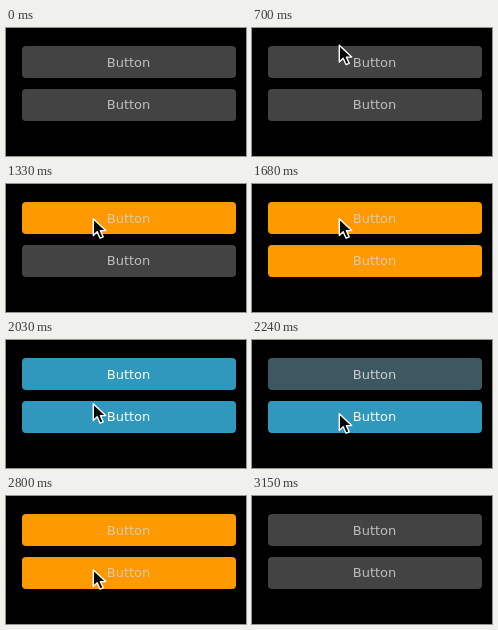
An HTML page that plays this animation: 240 by 128 pixels, repeating every 3430 ms.

```html
<!DOCTYPE html>
<html lang="en">
<head>
<meta charset="utf-8">
<title>Linked buttons</title>
<style>
  html, body { margin: 0; width: 100%; height: 100%; overflow: hidden; background: #000; }
  svg { display: block; width: 100%; height: 100%; }
  text { font: 13px "DejaVu Sans", sans-serif; text-anchor: middle; }
</style>
</head>
<body>
<svg viewBox="0 0 240 128">
  <g class="button">
    <rect x="16" y="18" width="214" height="32" rx="4"/>
    <text x="122.5" y="38.5">Button</text>
  </g>
  <g class="button">
    <rect x="16" y="61" width="214" height="32" rx="4"/>
    <text x="122.5" y="81">Button</text>
  </g>
  <path id="cursor" d="M.8 .8V17.5L4.7 13.8L7.6 20.2L10.7 18.8L7.9 12.6H13.2Z"
        fill="#080808" stroke="#fff" stroke-width="1.4" stroke-linejoin="round"/>
</svg>
<script>
const LOOP = 3430, STEP = 70;
const STYLES = {
  idle:  { fill: [67, 67, 67],   text: [190, 190, 190] },
  hover: { fill: [48, 152, 188], text: [248, 252, 253] },
  press: { fill: [255, 153, 0],  text: [218, 202, 165] }
};

// [start, state, number of fade steps]; one step is a hard change
const TOP = [
  [0, "idle", 1], [770, "hover", 4], [1330, "press", 1],
  [1750, "hover", 1], [2100, "idle", 4], [2590, "press", 4], [2940, "idle", 1]
];
const BOTTOM = [
  [0, "idle", 1], [770, "hover", 4], [1330, "idle", 1], [1470, "press", 4],
  [1750, "hover", 1], [2450, "press", 1], [2940, "hover", 1], [3080, "idle", 1]
];

// [time, y of the pointer tip]
const POINTER = [
  [560, 4], [840, 29], [980, 34], [1820, 34], [2030, 63],
  [2170, 73], [3010, 73], [3080, 102]
];
const POINTER_GONE = 3150;

const buttons = [...document.querySelectorAll(".button")];
const cursor = document.getElementById("cursor");
const mix = (a, b, k) => a + (b - a) * k;
const mixColor = (a, b, k) => `rgb(${a.map((v, i) => Math.round(mix(v, b[i], k)))})`;

function paintButton(button, track, time) {
  const i = track.findLastIndex(([start]) => start <= time);
  const [start, state, steps] = track[i];
  const from = STYLES[track[Math.max(i - 1, 0)][1]], to = STYLES[state];
  const k = Math.min(1, ((time - start) / STEP + 1) / steps);
  button.children[0].setAttribute("fill", mixColor(from.fill, to.fill, k));
  button.children[1].setAttribute("fill", mixColor(from.text, to.text, k));
}

function pointerY(time) {
  const i = POINTER.findIndex(([t]) => t > time);
  if (i < 0) return POINTER.at(-1)[1];
  const [t0, y0] = POINTER[i - 1], [t1, y1] = POINTER[i];
  return mix(y0, y1, (time - t0) / (t1 - t0));
}

function draw(now) {
  const time = Math.floor((now % LOOP) / STEP) * STEP;
  paintButton(buttons[0], TOP, time);
  paintButton(buttons[1], BOTTOM, time);
  const visible = time >= POINTER[0][0] && time < POINTER_GONE;
  cursor.style.display = visible ? "" : "none";
  if (visible) cursor.setAttribute("transform", `translate(86.5 ${pointerY(time)})`);
}

const begin = performance.now();
function tick() {
  draw(performance.now() - begin);
  requestAnimationFrame(tick);
}
tick();
</script>
</body>
</html>
```
